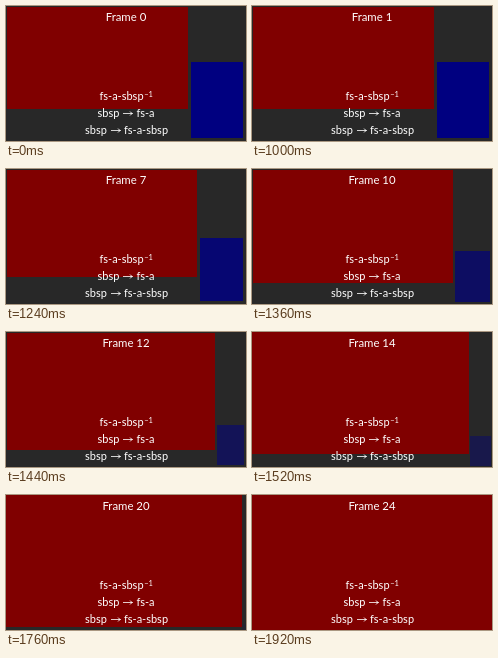
These frames come from a looping animation (240 by 135 pixels, 2920 ms). An HTML page:

```html
<!DOCTYPE html>
<html lang="en">
<head>
<meta charset="utf-8">
<title>Growing panel</title>
<style>
  html, body { margin: 0; width: 100%; height: 100%; overflow: hidden; background: #282828; }
  svg { display: block; width: 100vw; height: 100vh; }
  text { font: 11px Lato, "Open Sans", sans-serif; fill: #fff; text-anchor: middle; }
  .title { font-size: 11.4px; }
  .sup { font-size: 7.5px; }
  .arrow { fill: none; stroke: #fff; stroke-width: .8; }
</style>
</head>
<body>
<svg viewBox="0 0 240 135">
  <rect width="240" height="135" fill="#282828"/>
  <rect id="blue" fill="#000080"/>
  <rect id="red" fill="#800000"/>
  <text id="label" class="title" x="120" y="15"></text>
  <text x="115.5" y="94">fs-a-sbsp</text>
  <text class="sup" x="142.5" y="90.5">−1</text>
  <text x="102.5" y="111">sbsp</text>
  <path class="arrow" d="M117 107.5h9.5m-2.5-2q.7 1.5 2.5 2q-1.8.5-2.5 2"/>
  <text x="139.5" y="111">fs-a</text>
  <text x="90" y="128">sbsp</text>
  <path class="arrow" d="M105 124.5h9.5m-2.5-2q.7 1.5 2.5 2q-1.8.5-2.5 2"/>
  <text x="140" y="128">fs-a-sbsp</text>
</svg>
<script>
  const LOOP = 2920, HOLD = 1000, STEP = 40, LAST = 24;
  const [red, blue, label] = ["red", "blue", "label"].map(id => document.getElementById(id));
  const mix = (a, b, p) => a + (b - a) * p;

  // Edges snap to whole pixels.
  function setBox(el, from, to, p) {
    const [x1, y1, x2, y2] = from.map((v, i) => Math.round(mix(v, to[i], p)));
    el.setAttribute("x", x1);
    el.setAttribute("y", y1);
    el.setAttribute("width", x2 - x1);
    el.setAttribute("height", y2 - y1);
  }

  function draw(ms) {
    const t = ms % LOOP;
    const n = t < HOLD ? 0 : Math.min(LAST, 1 + Math.floor((t - HOLD) / STEP));
    const u = Math.max(0, n - 1) / (LAST - 1);
    const p = (1 - Math.cos(Math.PI * u)) / 2;
    setBox(red, [1, 1, 182, 103], [0, 0, 240, 134.6], p);
    setBox(blue, [185, 56, 237, 132], [240, 135, 240, 135], p);
    blue.setAttribute("opacity", 1 - p);
    label.textContent = "Frame " + n;
  }

  const start = performance.now();
  function tick() {
    draw(performance.now() - start);
    requestAnimationFrame(tick);
  }
  tick();
</script>
</body>
</html>
```
